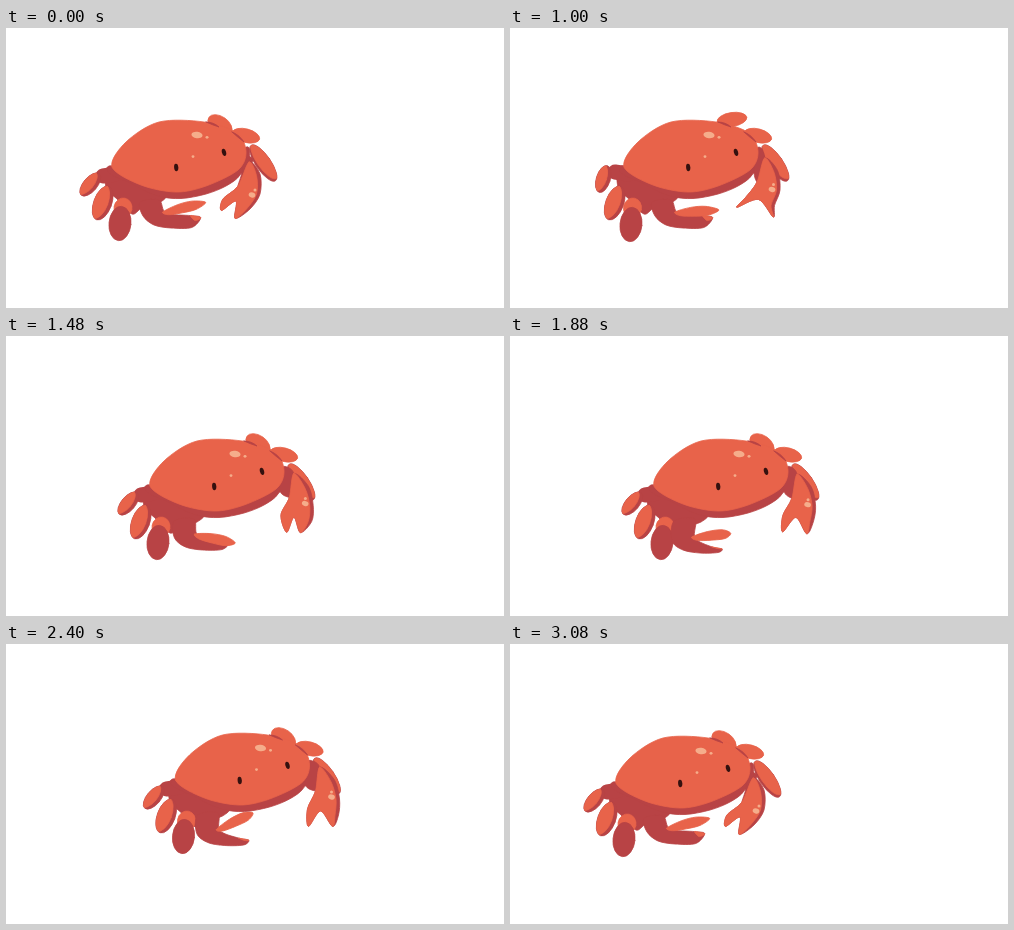
These frames come from a looping animation (498x280 px, 3400 ms). An HTML page with a canvas:

```html
<!DOCTYPE html>
<html lang="en">
<head>
<meta charset="utf-8">
<title>Crab</title>
<style>
html, body { margin: 0; width: 100%; height: 100%; overflow: hidden; background: #fff; }
canvas { display: block; width: 498px; height: 280px; }
</style>
</head>
<body>
<canvas id="stage" width="498" height="280"></canvas>
<script>
const ctx = document.getElementById('stage').getContext('2d');
const LOOP = 3400, STEP = 40, LAST = 3080;
const RED = '#e8634a', DARK = '#b84345', SPOT = '#f5ad8b', EYE = '#34110f';

// Each hop: travel, lift at its middle, wind-up before it, half steps of the legs
const hops = [
  { from: 160, to: 400, x: 8, y: 0, lift: 2, wind: 0, steps: 1 },
  { from: 1140, to: 1440, x: 30, y: 11, lift: 2, wind: -5, steps: 1 },
  { from: 1960, to: 2300, x: 25.5, y: -14, lift: 0, wind: 0, steps: 2 },
  { from: 2500, to: 3080, x: -63.5, y: 3, lift: 2, wind: 10, steps: 4 }
];

// Claw poses: hold from, hold to, right swing, right spread, left reach, left finger (degrees)
const rest = [0, 27, 0, -14];
const poses = [
  [0, 160, ...rest],
  [440, 600, 0, 27, 0, -20],
  [960, 1120, 0.5, 55, 0, -4],
  [1440, 1540, 0.95, 24, 0.5, 11],
  [1860, 1960, 0.85, 38, 1, -7],
  [2340, 2520, 1, 38, 0.75, -26],
  [LAST, LOOP, ...rest]
];

const shell = [106, 139, 120, 114, 153, 94, 198, 94, 231, 105, 240, 124,
  232, 142, 200, 158, 170, 164, 135, 157];
const belly = [106, 139, 128, 157, 152, 168, 175, 170.5, 200, 166, 220, 158, 234, 147, 239, 128];
const back = [103, 138, 135, 148, 160, 165, 153, 175, 136, 180, 126, 186, 112, 172, 100, 159];

const mix = (a, b, k) => a + (b - a) * k;
const clamp = k => Math.max(0, Math.min(1, k));
const smooth = k => k * k * (3 - 2 * k);
const rad = deg => deg * Math.PI / 180;

function bodyAt(t) {
  let x = 0, y = 0, phase = 0;
  for (const h of hops) {
    const k = clamp((t - h.from) / (h.to - h.from)), e = smooth(k);
    x += h.x * e + h.wind * Math.sin(Math.PI * clamp(k / 0.35));
    y += h.y * e - h.lift * Math.sin(Math.PI * k);
    phase += h.steps * e;
  }
  return { x, y, stride: (1 - Math.cos(Math.PI * phase)) / 2 };
}

function clawsAt(t) {
  let i = 0;
  while (i < poses.length - 2 && t >= poses[i + 1][0]) i++;
  const a = poses[i], b = poses[i + 1];
  const k = smooth(clamp((t - a[1]) / (b[0] - a[1])));
  return a.map((v, j) => mix(v, b[j], k)).slice(2);
}

// Closed smooth curve through the points
function trace(p) {
  const n = p.length / 2, at = i => [p[(i + n) % n * 2], p[(i + n) % n * 2 + 1]];
  ctx.beginPath();
  ctx.moveTo(p[0], p[1]);
  for (let i = 0; i < n; i++) {
    const [a, b, c, d] = [at(i - 1), at(i), at(i + 1), at(i + 2)];
    ctx.bezierCurveTo(b[0] + (c[0] - a[0]) / 6.5, b[1] + (c[1] - a[1]) / 6.5,
      c[0] - (d[0] - b[0]) / 6.5, c[1] - (d[1] - b[1]) / 6.5, c[0], c[1]);
  }
  ctx.closePath();
}

function paint(color, edge = 0.8) {
  ctx.fillStyle = ctx.strokeStyle = color;
  ctx.lineWidth = edge;
  ctx.fill();
  if (edge) ctx.stroke();
}

function blob(p, color) {
  trace(p);
  paint(color);
}

function oval(x, y, rx, ry, rot, color, edge) {
  ctx.beginPath();
  ctx.ellipse(x, y, rx, ry, rot, 0, Math.PI * 2);
  paint(color, edge);
}

// Dark oval with its lit copy shifted inside it
function shadedOval(x, y, rx, ry, rot, dx, dy) {
  ctx.save();
  oval(x, y, rx, ry, rot, DARK);
  ctx.clip();
  oval(x + dx, y + dy, rx, ry, rot, RED);
  ctx.restore();
}

function crease(x0, y0, x1, y1) {
  ctx.beginPath();
  ctx.moveTo(x0, y0);
  ctx.quadraticCurveTo((x0 + x1) / 2 + 1, (y0 + y1) / 2 - 2.5, x1, y1);
  ctx.quadraticCurveTo((x0 + x1) / 2, (y0 + y1) / 2 + 0.5, x0, y0);
  paint(DARK);
}

function drawLeftLegs(s) {
  blob(back, DARK);
  ctx.beginPath();
  ctx.moveTo(110, 146);
  ctx.lineTo(97, mix(148, 144, s));
  ctx.lineCap = 'round';
  ctx.lineWidth = 15;
  ctx.stroke();
  shadedOval(mix(84.3, 85.3, s), mix(156.5, 151, s), 7, 14, mix(0.7, 0.3, s), -3.5, -1.5);
  shadedOval(96.7, 175, 9, 17.8, 0.35, -3.5, -1.5);
  oval(mix(117, 114.5, s), 180, 9, 10, 0.2, RED);
  oval(mix(114, 113, s), mix(195.5, 196.5, s), 11, 17.2, 0.1, DARK);
}

function drawRightLegs(s) {
  oval(214, mix(97, 91.5, s), mix(13.5, 15, s), mix(8.5, 7, s), mix(0.6, -0.15, s), RED);
  oval(240, 107.7, 14, 6.8, 0.25, RED);
  shadedOval(257.3, 135, 7.5, 21.5, -0.6, 1, -2.5);
}

function drawLeftClaw(reach, angle) {
  const x = 157 - 13 * reach, y = 185 + 6 * reach;
  const jaw = rad(7 + 13 * reach), len = 38 - 6 * reach;
  const tip = [x + len * Math.cos(jaw), y + len * Math.sin(jaw)];
  const notch = [tip[0] - 10, tip[1] - 2];
  const heel = [tip[0] - 9 + 5 * reach, y + 14.5];
  blob([mix(134, 126, reach), 174, x - 20, y + 3, x - 9, y + 12, x + 8, y + 15,
    ...heel, ...tip, ...notch, x + 3, y, mix(153, 147, reach), 172], DARK);
  blob([...notch, ...tip, (tip[0] + heel[0]) / 2 - 1, (tip[1] + heel[1]) / 2 - 2], RED);

  ctx.save();
  ctx.translate(x, y);
  ctx.rotate(rad(angle));
  blob([0, -1, 16, -4.5, 31, -4.5, 44 - 5 * reach, 0, 33, 4.5, 19, 4.5, 5, 3], RED);
  ctx.restore();
}

function drawRightClaw(swing, spread) {
  const x = 230 + 21 * swing, y = 173 - 3 * swing;
  const lean = 30 * (1 - swing), len = 12 + 0.2 * spread;
  const tip = side => {
    const a = rad(lean + side * spread);
    return [x - len * Math.sin(a), y + len * Math.cos(a)];
  };
  const top = [243 + 7 * swing, 134 - 8 * swing];
  const neck = [x + 2 - 7 * swing, y - 15 - 5 * swing];
  const outline = edge => [
    ...top,
    x + 24 - 10 * swing - edge, y - 27 - 4 * swing + edge / 2,
    x + 24 - 5 * swing - edge, y - 7 - 5 * swing,
    x + 14 + 4 * swing - edge, y + 8 - 4 * swing,
    ...tip(-1), x, y, ...tip(1),
    x - 13, y - 2, ...neck
  ];
  blob([238, 122, 243, 120, ...top, neck[0] + 4, neck[1] - 3, ...neck, 236, 144], DARK);
  blob(outline(0), DARK);
  blob(outline(3.5), RED);
  const sx = x + 16 - 5 * swing, sy = y - 6 - 8 * swing;
  oval(sx, sy, 3.4, 2.5, 0.3, SPOT, 0);
  oval(sx + 3 - 3 * swing, sy - 5, 1.5, 1.5, 0, SPOT, 0);
}

function draw(t) {
  const { x, y, stride } = bodyAt(t);
  const [swing, spread, reach, angle] = clawsAt(t);
  ctx.fillStyle = '#fff';
  ctx.fillRect(0, 0, 498, 280);
  ctx.save();
  ctx.translate(x, y);

  drawLeftLegs(stride);
  drawRightLegs(stride);
  drawLeftClaw(reach, angle);
  blob(belly, DARK);
  drawRightClaw(swing, spread);
  blob(shell, RED);

  crease(200, 94, 213, 99);
  crease(226, 104, 238, 114);
  oval(191, 107, 5.6, 3.2, 0.15, SPOT, 0);
  oval(201, 109.3, 1.5, 1.4, 0, SPOT, 0);
  oval(187, 128.6, 1.4, 1.3, 0, SPOT, 0);
  oval(170.2, 139.5, 2.1, 3.7, -0.1, EYE, 0);
  oval(218, 124.3, 2.1, 3.7, -0.25, EYE, 0);
  ctx.restore();
}

const start = performance.now();
function tick() {
  const t = (performance.now() - start) % LOOP;
  draw(Math.min(LAST, Math.floor(t / STEP) * STEP));
  requestAnimationFrame(tick);
}
tick();
</script>
</body>
</html>
```
